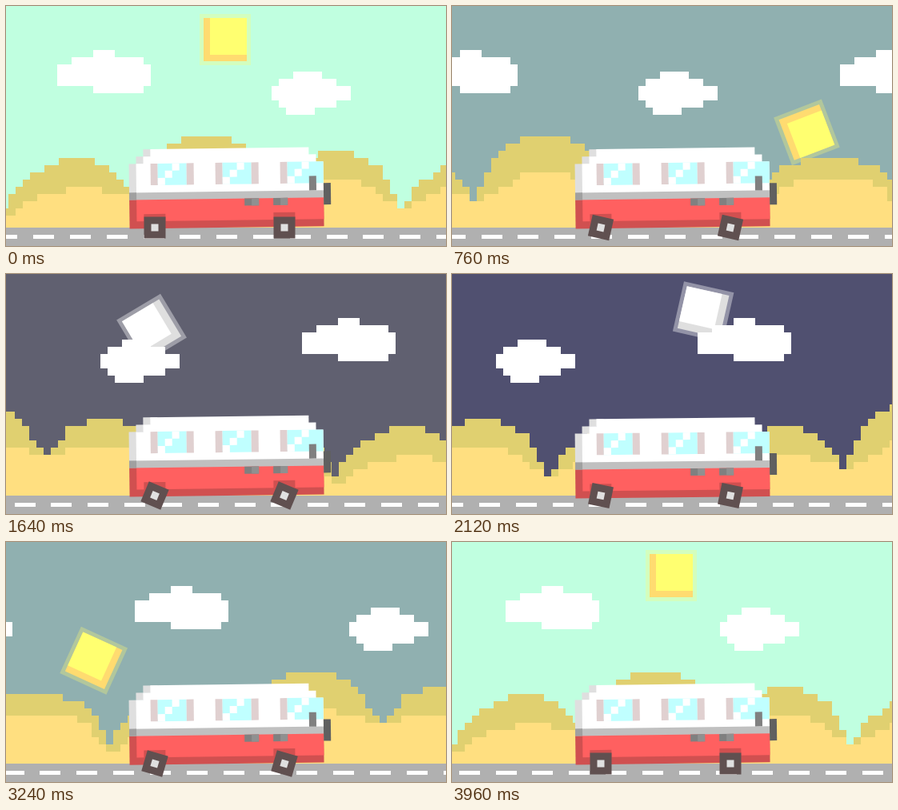
Recreate the animation shown at these times as an HTML page with a canvas. Size 550 by 300 pixels, loop 4 s.

```html
<!DOCTYPE html>
<html lang="en">
<head>
<meta charset="utf-8">
<title>Road trip</title>
<style>
  html, body { margin: 0; width: 100%; height: 100%; overflow: hidden; }
  canvas { display: block; }
</style>
</head>
<body>
<canvas id="stage" width="550" height="300"></canvas>
<script>
const ctx = document.getElementById('stage').getContext('2d');
const LOOP = 4000, STEP = 40, LAST = LOOP - STEP;
const CELL = 9, TAU = Math.PI * 2;

// Skylines of one hill tile, in cells (78 wide)
const HILLS_BACK = new Path2D('M0 34V26h1v-1h1v-1h1v-1h2v-1h2v-1h5v1h2v1h1v1h1v1h1v2h1' +
  'v-2h1v-2h1v-2h1v-1h1v-1h2v-1h7v1h2v1h1v1h1v2h1v1h1v1h1' +
  'v-1h1v-1h1v-2h3v-1h5v1h2v1h2v2h1v2h1v2h1' +
  'v-1h1v-2h1v-1h2v-1h1v-1h3v-1h8v1h3v1h1v1h1v2h1v2h1V34z');
const HILLS_FRONT = new Path2D('M0 34V29h1v-1h1v-1h2v-1h4v-1h5v1h4v1h2' +
  'v-1h2v-1h2v-1h1v-1h7v1h4v1h5v-1h9v1h2v1h1v1h2v1h2' +
  'v-1h2v-1h2v-1h2v-1h11v1h2v2h1v1h1v1h1V34z');

function rect(color, x, y, w, h) {
  ctx.fillStyle = color;
  ctx.fillRect(x, y, w, h);
}

// Runs draw() in its own coordinate system
function place(x, y, angle, scale, draw) {
  ctx.save();
  ctx.translate(x, y);
  ctx.rotate(angle);
  ctx.scale(scale, scale);
  draw();
  ctx.restore();
}

function drawSky(progress) {
  const night = 1 - Math.abs(1 - 2 * progress);
  const mix = (day, dark) => Math.min(255, Math.round((day + (dark - day) * night) / 16) * 16);
  rect(`rgb(${mix(193, 75)},${mix(252, 63)},${mix(230, 96)})`, 0, 0, 550, 300);
}

function drawSunAndMoon(progress) {
  place(274.5, 223, progress * TAU, 1, () => {
    rect('rgba(255,250,110,.3)', -32.5, -213, 64, 64);
    rect('#ffdb70', -27.5, -208, 54, 54);
    rect('#ffff70', -19.5, -208, 46, 46);
    rect('rgba(255,255,255,.38)', -32, 148, 64, 64);
    rect('#dfdfdf', -27, 153, 54, 54);
    rect('#fff', -18, 162, 45, 45);
  });
}

// Each row is [left, top, width, height] in cells
function drawCloud(x, y, rows) {
  place(x, y, 0, CELL, () => rows.forEach(row => rect('#fff', ...row)));
}

function drawClouds(progress) {
  const shift = Math.round(517 * progress);
  for (const tile of [0, 520, 1040]) {
    drawCloud(64 + tile - shift, 55, [[5, 0, 3, 1], [2, 1, 10, 1], [0, 2, 13, 3], [5, 5, 7, 1]]);
    drawCloud(332 + tile - shift, 82, [[3, 0, 4, 1], [1, 1, 8, 1], [0, 2, 11, 2], [1, 4, 8, 1], [2, 5, 4, 1]]);
  }
}

function drawHills(progress) {
  const shift = Math.round(698 * progress);
  for (const tile of [-702, 0, 702]) {
    place(3 + tile - shift, 1, 0, CELL, () => {
      ctx.fillStyle = '#e0d070';
      ctx.fill(HILLS_BACK);
      ctx.fillStyle = '#ffdf80';
      ctx.fill(HILLS_FRONT);
    });
  }
}

function drawRoad(progress) {
  const pitch = 550 / 12;
  const shift = 942 * progress % pitch;
  rect('#b0b0b0', 0, 277, 550, 23);
  for (let x = 34 - pitch - shift; x < 550; x += pitch) rect('#fff', Math.round(x), 286, 26, 5);
}

function drawWindow(column, glassWidth) {
  rect('#e0d0d0', column, 2, 1, 3);
  rect('#c0ffff', column + 1, 2, glassWidth, 3);
  if (glassWidth === 4) rect('#e0d0d0', column + 5, 2, 1, 3);
  for (let row = 0; row < 3; row++) rect('#fff', column + 3 - row, 2 + row, 1, 1);
}

function drawBody() {
  // Roof and cabin
  rect('#dfdfdf', 2, 0, 2, 1);
  rect('#dfdfdf', 1, 1, 2, 1);
  rect('#dfdfdf', 0, 2, 2, 5);
  rect('#fff', 3, 0, 22, 7);
  rect('#fff', 2, 1, 24, 6);
  rect('#fff', 1, 2, 26, 5);
  // Lower panels
  rect('#d05050', 0, 6.5, 27, 4.5);
  rect('#ff6060', 1, 6.5, 26, 3.5);
  rect('#c0c0c0', 0, 6, 27, 1);
  rect('#a0a0a0', 0, 6, 1, 1);
  for (const x of [2, 20]) rect('#d05050', x, 9, 3, 1.1);
  for (const x of [16, 20]) {
    rect('#808080', x, 7, 2, 1);
    rect('#909090', x + 1, 7, 1, 1);
  }
  drawWindow(3, 4);
  drawWindow(12, 4);
  drawWindow(21, 5);
  // Mirrors
  rect('#808080', 25, 4, 1, 2);
  rect('#606060', 27, 5, 1, 3);
}

function drawBus(progress) {
  const bob = (1 - Math.cos(progress * 5 * TAU)) / 2;
  const tilt = (-0.75 + 0.2 * bob) * Math.PI / 180;
  place(275.5, 231.8 + 3.5 * bob, tilt, CELL, () => {
    ctx.translate(-13.5, -6);
    drawBody();
  });
  for (const x of [186, 348]) {
    place(x, 277, progress * 8 * TAU, CELL, () => {
      rect('#605050', -1.5, -1.5, 3, 3);
      rect('#e0e0e0', -0.5, -0.5, 1, 1);
    });
  }
}

function render(now) {
  const progress = Math.floor(now % LOOP / STEP) * STEP / LAST;
  drawSky(progress);
  drawSunAndMoon(progress);
  drawClouds(progress);
  drawHills(progress);
  drawRoad(progress);
  drawBus(progress);
}

let start;
function tick(now) {
  start ??= now;
  render(now - start);
  requestAnimationFrame(tick);
}
render(0);
requestAnimationFrame(tick);
</script>
</body>
</html>
```
